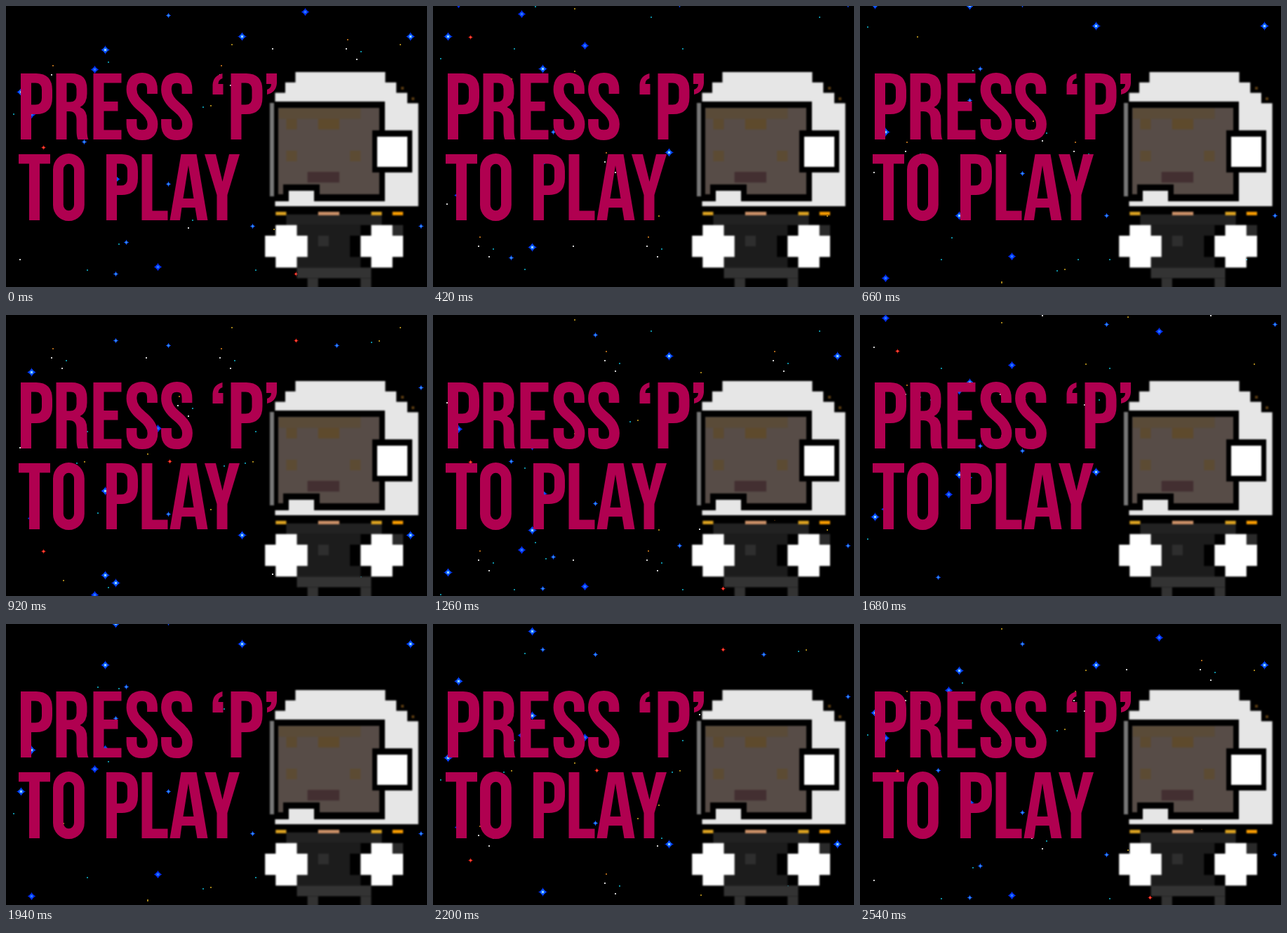
An HTML page that plays this animation: 600x400 px, repeating every 2.56 s.

```html
<!DOCTYPE html>
<html lang="en">
<head>
<meta charset="utf-8">
<title>Press P to play</title>
<style>
  html, body { margin: 0; width: 100%; height: 100%; overflow: hidden; background: #000; }
  svg { display: block; width: 600px; height: 400px; }
  #pilot { filter: blur(.9px); }
</style>
</head>
<body>
<svg id="stage" viewBox="0 0 600 400" role="img" aria-label="PRESS ‘P’ TO PLAY">
  <rect width="600" height="400"/>
  <g id="sky"></g>
  <g id="words" stroke="#b00050" fill="#b00050" fill-rule="evenodd"></g>
  <g id="pilot"></g>
</svg>
<script>
const NS = 'http://www.w3.org/2000/svg';
const TICK = 20, TICKS = 128, TILE = 240, SPAN = 2 * TILE, EDGE = 20;
const $ = id => document.getElementById(id);

function make(parent, tag, attrs) {
  const el = document.createElementNS(NS, tag);
  for (const k in attrs) el.setAttribute(k, attrs[k]);
  parent.appendChild(el);
  return el;
}

// ---- Sky: four layers, speed in px per tick ----
const FAST = 15, QUICK = 11.25, MID = 7.5, SLOW = 3.75;
const stars = [];

// A star is a stepped cross: wide short arms in the middle, thin long ones outside
function star(colors, reach) {
  return g => colors.forEach((fill, i) => {
    const r = reach - i * reach / colors.length;
    const w = i + .5;
    const d = w > r ? `M${-r} ${-r}H${r}V${r}H${-r}Z`
      : `M${-w} ${-r}H${w}V${r}H${-w}ZM${-r} ${-w}H${r}V${w}H${-r}Z`;
    make(g, 'path', { d, fill });
  });
}
const dot = fill => g => make(g, 'path', { d: 'M-.5-.5h2v2h-2z', fill });

const big = star(['#0028e0', '#0038ff', '#1060ff', '#8cd4ff'], 6);
const dark = star(['#001cc0', '#0028e8', '#0a40ff', '#2a80ff'], 5.5);
const small = star(['#0034f0', '#2a80ff'], 3.5);
const red = star(['#d00000', '#ff4030'], 3);
const white = dot('#d0d0d0'), cyan = dot('#0c8ca0');
const gold = dot('#a08018'), amber = dot('#a86418');

// Puts `count` equal stars side by side, one tile apart
function add(speed, art, x, y, count = 1) {
  for (let i = 0; i < count; i++) {
    const el = make($('sky'), 'g', {});
    art(el);
    stars.push({ x: x + i * TILE, y, speed, el });
  }
}
function cluster(speed, x, y, count) {
  add(speed, amber, x, y, count);
  add(speed, white, x - 2, y + 13, count);
  add(speed, white, x + 13, y + 28, count);
  add(speed, cyan, x + 19, y + 17, count);
}
function pair(speed, x, y, count) {
  add(speed, gold, x, y, count);
  add(speed, cyan, x - 11, y + 2, count);
}

add(FAST, big, 336, 43, 2);
add(FAST, dark, 216, 371);
add(FAST, small, 231, 13);
add(FAST, small, 231, 253, 2);
add(FAST, small, 111, 193);
add(FAST, small, 351, 313, 2);
add(FAST, red, 233, 418);
add(FAST, cyan, 115, 375, 2);
add(FAST, gold, 201, 407);
add(FAST, gold, 201, 471);
pair(FAST, 111, 418, 2);
pair(FAST, 531, 246);

add(QUICK, dark, 426, 8);
add(QUICK, cyan, 310, 251, 2);
add(QUICK, gold, 321, 54, 2);
add(QUICK, gold, 81, 414);
add(QUICK, white, 199, 97);
cluster(QUICK, 66, 84, 2);

add(MID, big, 156, 246);
add(MID, big, 36, 426);
add(MID, dark, 36, 154);
add(MID, small, 156, 381);
add(MID, small, 171, 336);
add(MID, red, 53, 201);
add(MID, red, 413, 381);
add(MID, cyan, 160, 338);
add(MID, gold, 201, 160);
pair(MID, 291, 141);

add(SLOW, big, 141, 62);
add(SLOW, big, 141, 422);
add(SLOW, big, 21, 122);
add(SLOW, dark, 126, 90);
add(SLOW, white, 379, 60);
add(SLOW, white, 19, 360);
add(SLOW, cyan, 145, 79);
add(SLOW, cyan, 10, 153);
add(SLOW, cyan, 130, 453);
add(SLOW, gold, 381, 317);
cluster(SLOW, 486, 47);
cluster(SLOW, 246, 287, 2);

// ---- Condensed lettering, 94 px tall: advance, outline, stroke ----
const STEM = 14.8;
const quote = 'M0 0H15V14Q14 27 1 30V23Q7 21 7 15H0Z';
const glyphs = {
  P: [50.5, 'M0 0H22Q45 0 45 24V34Q45 58 22 58H15V94H0ZM15 13.5V44.5H21Q30 44.5 30 35V23Q30 13.5 21 13.5Z'],
  R: [53, 'M0 0H22Q44 0 44 22V29Q44 43 34 48Q44 52 44 66V81Q44 90 46 94H31Q29 90 29 81V66Q29 54 19 54H15V94H0ZM15 13.5V40.5H20Q29 40.5 29 31V22Q29 13.5 21 13.5Z'],
  E: [47, 'M0 0H40V13.5H15V40H35V53.5H15V80.5H40V94H0Z'],
  S: [49.5, 'M37 29V23Q37 6.3 22.5 6.3Q7.5 6.3 7.5 23Q7.5 36 22.5 48Q37.5 60 37.5 72Q37.5 87.7 22.5 87.7Q7.5 87.7 7.5 72V65', STEM],
  T: [49, 'M0 0H45V13.5H30V94H15V13.5H0Z'],
  O: [52, 'M7.4 22A15 15.7 0 0 1 37.4 22V72A15 15.7 0 0 1 7.4 72Z', STEM],
  L: [40, 'M0 0H15V80.5H37V94H0Z'],
  A: [49.5, 'M16 0H38L54 94H39L36 76H17L14.5 94H0ZM19 63H34L26.5 16Z'],
  Y: [50, 'M0 0H16L25.5 39 35 0H50L32.5 58V94H17.5V58Z'],
  '‘': [26, 'M15 30H0V16Q1 3 14 0V7Q8 9 8 15H15Z'],
  '’': [20, quote],
  ' ': [24, '']
};
function write(text, x, y) {
  for (const c of text) {
    const [advance, d, line = 0] = glyphs[c];
    const el = make($('words'), 'path', { d, transform: `translate(${x} ${y})`, 'stroke-width': line });
    if (line) el.setAttribute('fill', 'none');
    x += advance;
  }
}
write('PRESS ‘P’', 21, 96);
write('TO PLAY', 18, 211);

// ---- Astronaut ----
function box(fill, x, y, w, h) {
  make($('pilot'), 'rect', { x, y, width: w, height: h, fill });
}
// Face and body share one grid of square cells
const CELL = 15.13, LEFT = 369.2, TOP = 145.4;
function cell(fill, col, row, w = 1, h = 1) {
  box(fill, LEFT + col * CELL, TOP + row * CELL, w * CELL, h * CELL);
}

box('#000', 376, 134, 220, 159);
for (let i = 0; i < 4; i++) {
  const l = Math.max(383.5, 412.5 - 14.5 * i), r = 540.5 + 15.7 * i, t = 94 + 14.8 * i;
  box('#e6e6e6', l, t, r - l, i < 3 ? 16 : 285 - t);
}
box('#000', 376, 136, 164, 142);
box('#777', 376, 138, 6, 133);
box('#574c47', 388, 145, 144, 123);

cell('#5a4b38', 1.3, 0, 7.7);
cell('#5c4a30', 2, 1);
cell('#5e4a2c', 5, 1, 2);
cell('#5c4b33', 2, 4);
cell('#5c4b33', 8, 4);
cell('#432f31', 4, 6, 3);

box('#000', 395, 254, 52, 24);
box('#e6e6e6', 403, 263, 36, 18);
box('#000', 522, 177, 57, 60);
box('#fff', 529, 186, 43, 43);
box('#5a3a10', 563, 115, 4, 4);
box('#5a3a10', 578, 130, 4, 4);

cell('#222', 2, 10, 9);
cell('#1c1c1c', 3, 11, 6, 4);
cell('#2e2e2e', 5, 12);
cell('#000', 8, 12, 1, 2);
cell('#2a2a2a', 12, 11);
cell('#333', 3, 15, 7);
for (const col of [4, 9]) cell('#333', col, 16);

// Buckles on the collar
const COLLAR = 9.75;
cell('#d9a020', 1, COLLAR, 1, .33);
cell('#c98f66', 5, COLLAR, 2, .33);
cell('#d9a020', 10, COLLAR, 1, .33);
cell('#f59a00', 12, COLLAR, 1, .33);

for (const col of [0, 9]) {
  cell('#fff', col + 1, 11, 2, 4);
  cell('#fff', col, 12, 4, 2);
}

// ---- Motion ----
const wrap = (v, n) => ((v % n) + n) % n;

function draw(ms) {
  let t = Math.floor(ms / TICK) % TICKS;
  if (t === 1) t = 0; // the opening pose holds for two ticks
  for (const s of stars) {
    const y = wrap(s.y - s.speed * t + EDGE, SPAN) - EDGE;
    s.el.setAttribute('transform', `translate(${s.x + .5} ${Math.round(y) + .5})`);
  }
}

const start = performance.now();
function loop() {
  draw(performance.now() - start);
  requestAnimationFrame(loop);
}
loop();
</script>
</body>
</html>
```
